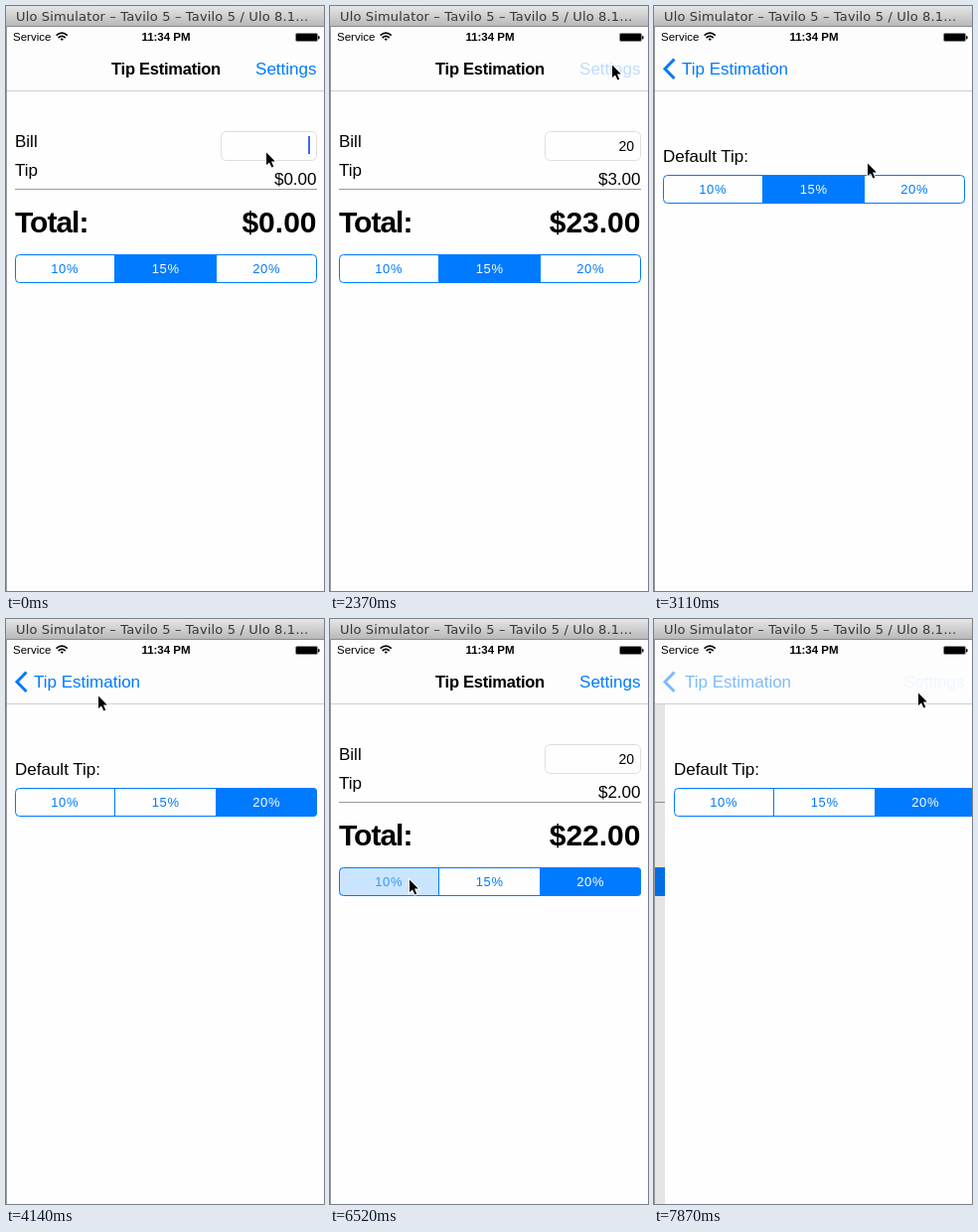
Write an HTML page that moves like this. It is 320 px wide and 589 px high and loops after 8000 ms.

```html
<!DOCTYPE html>
<html lang="en">
<head>
<meta charset="utf-8">
<title>Tip Estimation</title>
<style>
  html, body { margin: 0; width: 100%; height: 100%; overflow: hidden; background: #fefefe; }
  svg { display: block; width: 100%; height: 100%; }
  text { font: 17px "Liberation Sans", Arial, sans-serif; fill: #000; }
  .bold { font-weight: bold; }
  .blue { fill: #007aff; }
  .end { text-anchor: end; }
  .mid { text-anchor: middle; }
  .seg { font-size: 13px; letter-spacing: .6px; }
  .small { font-size: 11.5px; }
  .big { font-size: 30px; }
  .window { font: 13px "DejaVu Sans", sans-serif; letter-spacing: .16px; fill: #383838; }
</style>
</head>
<body>
<svg viewBox="0 0 320 589">
  <defs>
    <linearGradient id="bar" x2="0" y2="1">
      <stop offset="0" stop-color="#e6e6e6"/>
      <stop offset="1" stop-color="#b6b6b6"/>
    </linearGradient>
    <clipPath id="round"><rect x="9" width="304" height="29" rx="4"/></clipPath>
  </defs>
  <rect width="320" height="589" fill="#fefefe"/>

  <g id="main">
    <text x="9" y="142">Bill</text>
    <rect x="216.5" y="126.5" width="96" height="29" rx="5" fill="#fefefe" stroke="#dedede"/>
    <text id="bill" class="end" y="146" style="font-size:14px"></text>
    <rect id="caret" x="304" y="131" width="2" height="18" fill="#4169e8"/>
    <text x="9" y="171">Tip</text>
    <text id="tip" class="end" x="312.5" y="180"></text>
    <path d="M9 184.5H313" stroke="#9a9a9a"/>
    <text class="bold big" x="9" y="228" style="letter-spacing:-1px">Total:</text>
    <text id="total" class="bold big end" x="312.5" y="228"></text>
    <g id="rates" transform="translate(0 250)"></g>
  </g>
  <rect id="dim" y="85" width="320" height="504"/>

  <g id="prefs">
    <rect y="85" width="320" height="504" fill="#fefefe"/>
    <text x="9" y="157">Default Tip:</text>
    <g id="defaults" transform="translate(0 170)"></g>
  </g>

  <rect y="21" width="320" height="64" fill="#fdfdfd"/>
  <path d="M0 85.5H320" stroke="#cfcfcf"/>
  <text id="title" class="bold mid" x="161" y="69" style="font-size:16.5px;letter-spacing:-.25px">Tip Estimation</text>
  <text id="settings" class="blue end" x="312.5" y="69">Settings</text>
  <path id="chevron" d="M20.5 53.5L11 63.2L20.5 73" fill="none" stroke="#007aff" stroke-width="3"/>
  <text id="back" class="blue" x="28" y="69">Tip Estimation</text>

  <text class="small" x="7" y="35">Service</text>
  <g fill="none" stroke="#000" stroke-width="1.7">
    <path d="M50.6 29.6Q56.2 24.6 61.8 29.6M52.7 32Q56.2 28.8 59.7 32"/>
    <path d="M54.6 33.2Q56.2 31.8 57.8 33.2L56.2 35Z" fill="#000" stroke="none"/>
  </g>
  <text class="bold small mid" x="161" y="35">11:34 PM</text>
  <rect x="291.5" y="27.5" width="22" height="8" rx="1.5" fill="#000" stroke="#8a8a8a"/>
  <rect x="314" y="30" width="1.5" height="3.4" rx=".7"/>

  <rect width="320" height="21" fill="url(#bar)"/>
  <path d="M0 20.5H320" stroke="#8c8c8c"/>
  <text class="window" x="10" y="15">Ulo Simulator – Tavilo 5 – Tavilo 5 / Ulo 8.1…</text>
  <path d="M.5 21V589" stroke="#999"/>

  <path id="cursor" d="M1 .5V13L4 10.4L6.4 15.5L8.3 14.7L6 9.6H9.8Z" stroke="#fff" stroke-width="2" paint-order="stroke"/>
</svg>
<script>
const LOOP = 8000, TICK = 148.2, LAST = 53;
const RATES = [10, 15, 20];
const EDGES = [9, 109.5, 211.5, 313];
const PUSH = 16, POP = 31.4, PUSH_AGAIN = 51;

// Pointer stops: tick, x, y
const STOPS = [
  [5, 261, 147], [6, 262, 190], [8, 268, 316], [9, 268, 318], [10, 269, 312],
  [12, 281, 100], [13, 284, 62], [14, 283, 59], [18, 283, 59], [19, 276, 72],
  [21, 214, 158], [22, 238, 173], [23, 256, 180], [25, 257, 180], [28, 92, 77],
  [29, 82, 67], [30, 84, 73], [31, 84, 75], [34, 84, 75], [37, 136, 262],
  [38, 97, 264], [39, 79, 262], [45, 79, 262], [48, 303, 67], [49, 265, 74]
];

const $ = id => document.getElementById(id);
const clamp = v => Math.max(0, Math.min(1, v));
const set = (id, name, value) => $(id).setAttribute(name, value);
const shift = (id, x, y = 0) =>
  set(id, 'transform', `translate(${Math.round(x)} ${Math.round(y)})`);
const spring = u => 1 - (1 + 2.6 * u) * Math.exp(-2.6 * u);
const money = v => '$' + v.toFixed(2);

function buildSegments(id) {
  const cells = RATES.map((_, i) =>
    `<rect x="${EDGES[i]}" width="${EDGES[i + 1] - EDGES[i]}" height="29"/>`).join('');
  const labels = RATES.map((r, i) =>
    `<text class="seg mid" x="${[59.2, 160.7, 262.2][i]}" y="19">${r}%</text>`).join('');
  $(id).innerHTML = `<g clip-path="url(#round)">${cells}</g>
    <path d="M109.5 0V29M211.5 0V29" stroke="#007aff"/>
    <rect x="9.5" y=".5" width="303" height="28" rx="4" fill="none" stroke="#007aff"/>${labels}`;
}

function paintSegments(id, chosen, pressed) {
  const cells = $(id).querySelectorAll('g rect');
  $(id).querySelectorAll('text').forEach((label, i) => {
    const on = RATES[i] === chosen, held = RATES[i] === pressed;
    cells[i].setAttribute('fill', on ? '#007aff' : held ? '#cae5ff' : '#fefefe');
    label.style.fill = on ? '#fff' : held ? '#3a97f5' : '#007aff';
  });
}

function pointer(n) {
  const i = STOPS.findIndex(s => s[0] >= n);
  if (i < 0) return STOPS[STOPS.length - 1].slice(1);
  if (i === 0) return STOPS[0].slice(1);
  const [a, ax, ay] = STOPS[i - 1], [b, bx, by] = STOPS[i];
  const k = (n - a) / (b - a);
  return [ax + (bx - ax) * k, ay + (by - ay) * k];
}

// Slide progress and opacities of the navigation bar items
function navigation(n) {
  if (n >= 30 && n < PUSH_AGAIN) {
    const u = Math.max(0, n - POP), shown = clamp(u / 2.5);
    return { p: 1 - spring(u), title: shown, settings: shown, back: .3 * clamp(1 - u / 2) };
  }
  const u = Math.max(0, n - (n < 30 ? PUSH : PUSH_AGAIN));
  const held = n >= PUSH - 1;
  return {
    p: spring(u),
    title: clamp(1 - u / 2),
    settings: held ? clamp(.25 - .1 * u) : 1,
    back: clamp(u / 4)
  };
}

function render(time) {
  const n = Math.min(LAST, Math.floor((time % LOOP + 12) / TICK));
  const editing = n < 9;
  const rate = n < 30 ? 15 : n < 44 ? 20 : 10;
  const tip = editing ? 0 : 20 * rate / 100;

  $('bill').textContent = '20'.slice(0, Math.max(0, n - 1));
  set('bill', 'x', editing ? 304 : 306);
  set('caret', 'opacity', editing ? 1 : 0);
  $('tip').textContent = money(tip);
  $('total').textContent = money(editing ? 0 : 20 + tip);
  paintSegments('rates', n === 44 ? 20 : rate, n === 44 ? 10 : 0);
  paintSegments('defaults', n < 25 ? 15 : 20, n === 24 ? 20 : 0);

  const nav = navigation(n), left = 1 - nav.p;
  shift('main', -96 * nav.p);
  set('dim', 'opacity', .1 * nav.p);
  shift('prefs', 320 * left);
  shift('title', -78 * nav.p);
  shift('back', 78 * left);
  set('title', 'opacity', nav.title);
  set('settings', 'opacity', nav.settings);
  set('back', 'opacity', nav.back);
  set('chevron', 'opacity', nav.back);
  shift('cursor', ...pointer(n));
}

buildSegments('rates');
buildSegments('defaults');
const start = performance.now();
(function frame() {
  render(performance.now() - start);
  requestAnimationFrame(frame);
})();
</script>
</body>
</html>
```
